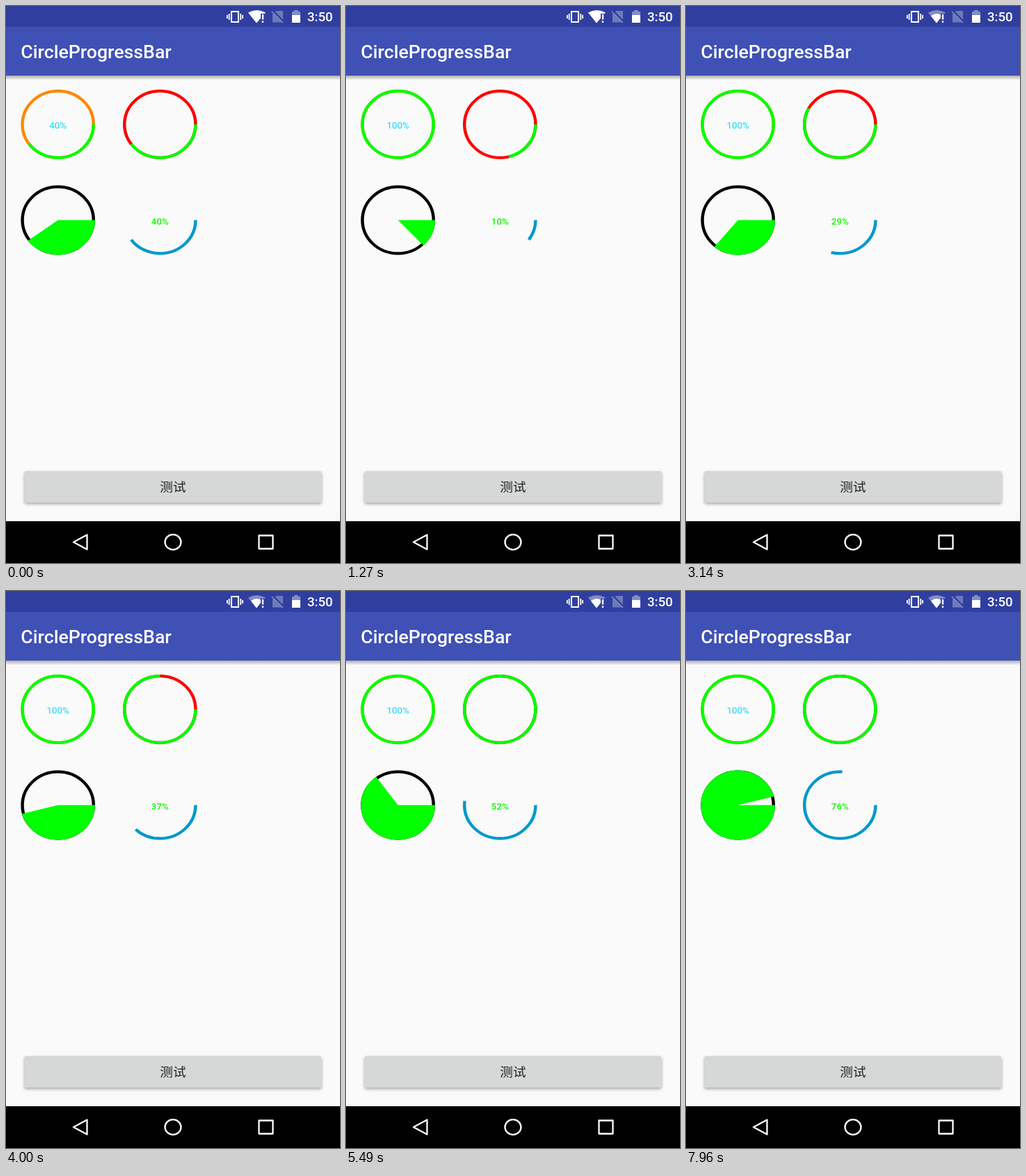
Recreate the animation shown at these times as an HTML page with a canvas. Size 480x800 px, loop 7.99 s.

```html
<!DOCTYPE html>
<html lang="zh">
<head>
<meta charset="utf-8">
<title>CircleProgressBar</title>
<style>
html, body { margin: 0; width: 100%; height: 100%; overflow: hidden; background: #fafafa; }
canvas { display: block; }
</style>
</head>
<body>
<canvas id="stage" width="480" height="800"></canvas>
<script>
const ctx = document.getElementById('stage').getContext('2d');
const LOOP = 7990;
const PRESS = 209;        // moment the bars restart
const WIFI_DROP = 1700;   // moment the signal weakens
const STATUS = '#303f9f', FADED = '#838cc5', GREEN = '#00ff00';
const ROBOTO = 'Roboto, sans-serif';

function rect(x, y, w, h, color) {
  ctx.fillStyle = color;
  ctx.fillRect(x, y, w, h);
}

function fill(path, color) {
  ctx.fillStyle = color;
  ctx.fill(new Path2D(path));
}

function text(str, x, y, font, color, align = 'center') {
  ctx.font = font;
  ctx.fillStyle = color;
  ctx.textAlign = align;
  ctx.fillText(str, x, y);
}

// The layout is a 1080 x 1920 phone screen squeezed onto the stage.
function onPhone(draw) {
  ctx.save();
  ctx.scale(480 / 1080, 800 / 1920);
  draw();
  ctx.restore();
}

function percent(t, step) {
  return t < PRESS ? 40 : Math.min(100, Math.floor((t - PRESS) / step));
}

function arc(x, y, value, color) {
  ctx.beginPath();
  ctx.arc(x, y, 115, 0, value / 100 * Math.PI * 2);
  ctx.lineWidth = 10;
  ctx.strokeStyle = color;
  ctx.stroke();
}

function pie(x, y, value, color) {
  ctx.beginPath();
  ctx.moveTo(x, y);
  ctx.arc(x, y, 120, 0, value / 100 * Math.PI * 2);
  ctx.fillStyle = color;
  ctx.fill();
}

function label(x, y, value, color, weight) {
  text(value + '%', x, y + 15, `${weight} 30px ${ROBOTO}`, color);
}

function drawBars(t) {
  const left = 168, right = 498, top = 408, bottom = 738;
  const a = percent(t, 10), b = percent(t, 50.4);
  const c = percent(t, 80.7), d = percent(t, 100.7);

  arc(left, top, 100, '#ff8800');
  arc(left, top, a, GREEN);
  label(left, top, a, '#0cd4fc', 400);

  arc(right, top, 100, '#ff0000');
  arc(right, top, b, GREEN);

  arc(left, bottom, 100, '#000');
  pie(left, bottom, c, GREEN);

  arc(right, bottom, d, '#0099cc');
  label(right, bottom, d, '#10fa00', 500);
}

function drawPage() {
  rect(0, 0, 1080, 1920, '#fafafa');
  const shade = ctx.createLinearGradient(0, 240, 0, 256);
  shade.addColorStop(0, 'rgba(0,0,0,.3)');
  shade.addColorStop(1, 'rgba(0,0,0,0)');
  rect(0, 240, 1080, 16, shade);
  rect(0, 72, 1080, 168, '#3f51b5');
  rect(0, 0, 1080, 72, STATUS);
  rect(0, 1776, 1080, 144, '#000');
  text('CircleProgressBar', 48, 180.5, '500 60px ' + ROBOTO, '#fff', 'left');
  text('3:50', 974, 53, '500 42px ' + ROBOTO, '#fff', 'left');
}

function drawButton() {
  ctx.save();
  ctx.shadowColor = 'rgba(0,0,0,.35)';
  ctx.shadowBlur = 4;
  ctx.shadowOffsetY = 2;
  ctx.fillStyle = '#d6d7d7';
  ctx.beginPath();
  ctx.roundRect(60, 1603, 960, 109, 6);
  ctx.fill();
  ctx.restore();
  text('测试', 540, 1673, '42px "Noto Sans CJK SC", "Noto Sans CJK", sans-serif', '#212121');
}

function drawStatusIcons(t) {
  // vibrate
  ctx.strokeStyle = '#fff';
  ctx.lineWidth = 2;
  ctx.strokeRect(324, 8, 10, 15);
  for (const [x, y, h] of [[319.8, 11, 9], [336.4, 11, 9], [317, 13, 5], [339.2, 13, 5]]) {
    rect(x, y, 1.8, h, '#fff');
  }

  // wifi with warning mark
  const weak = t >= WIFI_DROP;
  fill('M360 24.5 L348 9.5 Q360.5 2.5 373 9.5 Z', weak ? FADED : '#fff');
  if (weak) fill('M360 24.5 L352 14.2 Q360.5 8 368 14 Z', '#fff');
  rect(366, 11, 8, 14, STATUS);
  rect(367.8, 12, 2.4, 7.5, '#fff');
  rect(367.8, 21.5, 2.4, 2.4, '#fff');

  // no sim
  fill('M388.5 7 H398 V23.5 H383 V12 Z', '#6e79bb');
  ctx.lineWidth = 3.4;
  for (const [color, shift] of [[STATUS, 1], [FADED, 0]]) {
    ctx.strokeStyle = color;
    ctx.beginPath();
    ctx.moveTo(382 + shift, 8 - shift);
    ctx.lineTo(398 + shift, 24 - shift);
    ctx.stroke();
    ctx.lineWidth = 1.6;
  }

  // battery
  rect(414, 6, 6, 2, FADED);
  rect(411, 8, 12, 5, FADED);
  rect(411, 13, 12, 11, '#fff');
}

function drawNavIcons() {
  ctx.strokeStyle = '#fff';
  ctx.lineWidth = 2.3;
  ctx.lineJoin = 'round';
  ctx.stroke(new Path2D('M97 770 L116.5 759.5 V780.5 Z'));
  ctx.beginPath();
  ctx.ellipse(240, 770, 11.5, 10.8, 0, 0, Math.PI * 2);
  ctx.stroke();
  ctx.strokeRect(363.5, 760.5, 20, 19);
  ctx.lineJoin = 'miter';
}

function render(t) {
  onPhone(() => {
    drawPage();
    drawBars(t);
    drawButton();
  });
  drawStatusIcons(t);
  drawNavIcons();
}

let start;
function tick(now) {
  start ??= now;
  render(Math.max(0, now - start) % LOOP);
  requestAnimationFrame(tick);
}
render(0);
requestAnimationFrame(tick);
</script>
</body>
</html>
```
